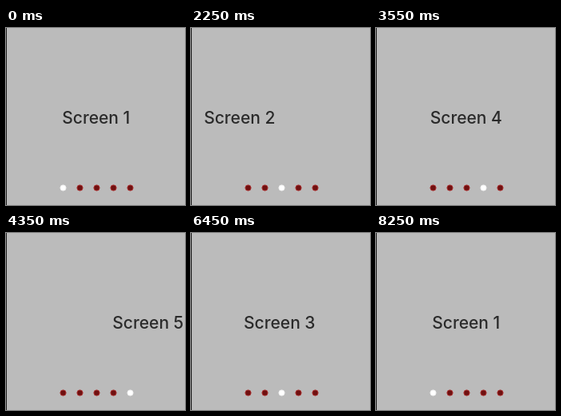
An HTML page that plays this animation: 224 by 222 pixels, repeating every 8450 ms.

```html
<!DOCTYPE html>
<html lang="en">
<head>
<meta charset="utf-8">
<title>Paged screens</title>
<style>
  html, body { margin: 0; width: 100%; height: 100%; overflow: hidden; background: #bbb; }
  svg { display: block; width: 224px; height: 222px; }
  text { font: 500 21px Inter, Roboto, sans-serif; fill: #2a2a2a; text-anchor: middle; }
  circle { fill: #701010; stroke: #ae3535; stroke-width: 1px; }
  circle.on { fill: #fff; stroke: #eee; }
</style>
</head>
<body>
<svg id="stage" viewBox="0 0 224 222">
  <rect width="224" height="222" fill="#bbb"/>
  <g id="pages"></g>
  <g id="dots"></g>
  <rect width="1" height="222" fill="#222"/>
</svg>
<script>
const LOOP = 8450, STEP = 100, PAGE = 224, COUNT = 5;
// Distance travelled on each step after the finger lets go
const GLIDE = [52, 159, 200, 222, PAGE];
// lead: slow drag steps before the release
const SWIPES = [
  { start: 1250, to: 1, lead: 0 },
  { start: 2250, to: 2, lead: 0 },
  { start: 2850, to: 3, lead: 3 },
  { start: 4150, to: 4, lead: 1 },
  { start: 5250, to: 3, lead: 0 },
  { start: 5950, to: 2, lead: 2 },
  { start: 7050, to: 1, lead: 0 },
  { start: 7850, to: 0, lead: 0 }
];

function add(parent, tag, attrs) {
  const el = document.createElementNS('http://www.w3.org/2000/svg', tag);
  for (const name in attrs) el.setAttribute(name, attrs[name]);
  return document.getElementById(parent).appendChild(el);
}

const pages = document.getElementById('pages');
const dots = [];
for (let i = 0; i < COUNT; i++) {
  add('pages', 'text', { x: 112.8 + i * PAGE, y: 120 }).textContent = 'Screen ' + (i + 1);
  dots.push(add('dots', 'circle', { cx: 71.5 + i * 21, cy: 200.5, r: 3.6 }));
}

function travel(step, lead) {
  if (step < lead) return GLIDE[0] * ((step + 1) / (lead + 1)) ** 2;
  return GLIDE[Math.min(step - lead, GLIDE.length - 1)];
}

function stateAt(t) {
  let scroll = 0, active = 0, from = 0;
  for (const { start, to, lead } of SWIPES) {
    if (t < start) break;
    const step = Math.floor((t - start) / STEP);
    scroll = from * PAGE + (to - from) * travel(step, lead);
    active = step < lead ? from : to;
    from = to;
  }
  return { scroll, active };
}

function draw(t) {
  const { scroll, active } = stateAt(t);
  pages.setAttribute('transform', `translate(${-scroll} 0)`);
  dots.forEach((dot, i) => dot.classList.toggle('on', i === active));
}

const begin = performance.now();
function tick() {
  draw((performance.now() - begin) % LOOP);
  requestAnimationFrame(tick);
}
tick();
</script>
</body>
</html>
```
